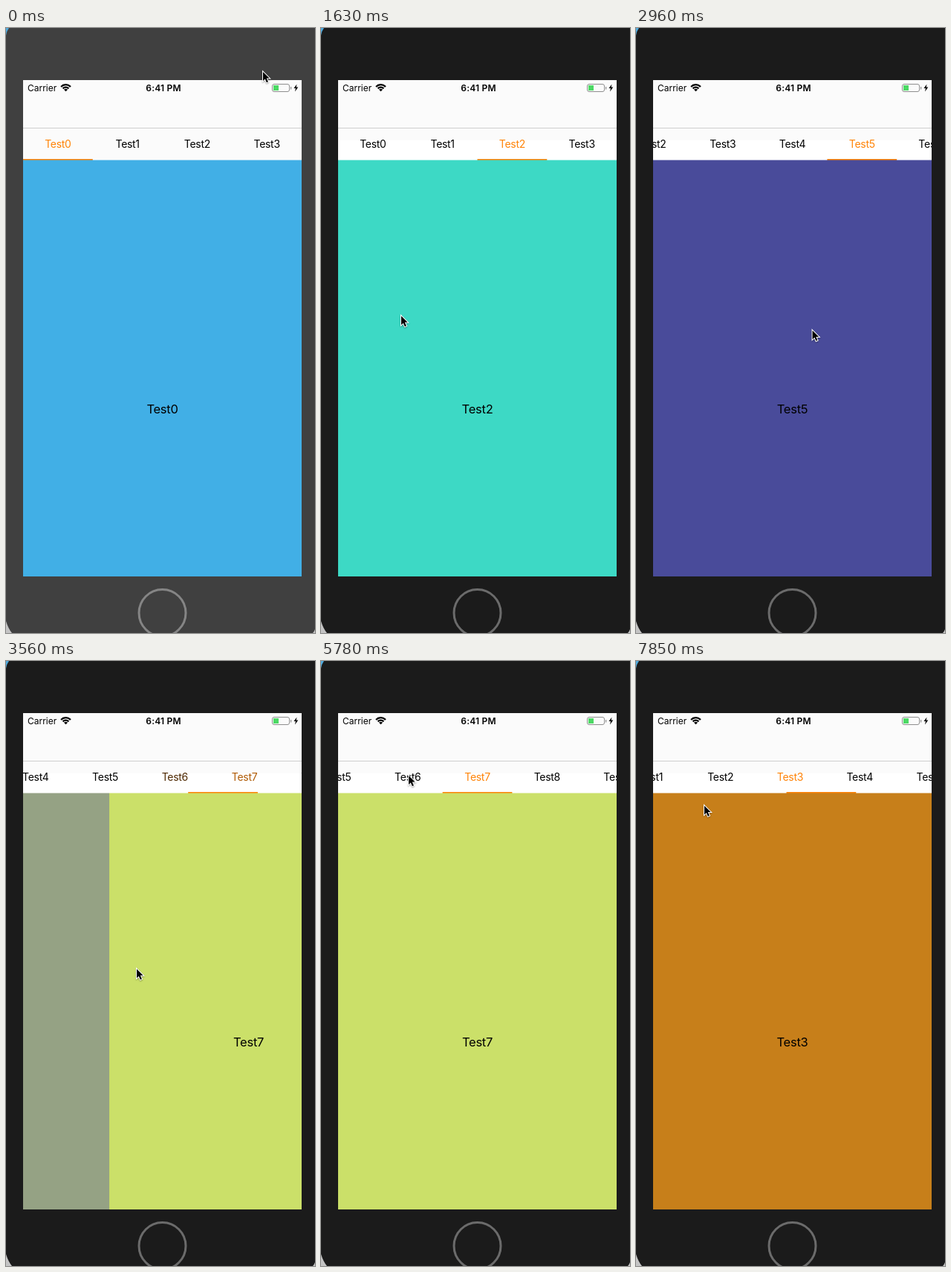
Animation, 416 px wide and 813 px high, one loop 8000 ms. Source, as an HTML page with a canvas:

```html
<!DOCTYPE html>
<html lang="en">
<head>
<meta charset="utf-8">
<title>Paged tabs</title>
<style>
  html, body { margin: 0; width: 100%; height: 100%; overflow: hidden; background: #1b1b1b; }
  canvas { display: block; width: 416px; height: 813px; }
</style>
</head>
<body>
<canvas></canvas>
<script>
const W = 416, H = 813, LOOP = 8000, STEPS = 54;
const SCREEN = { x: 23, y: 70, w: 375, h: 667 };
const TAB = SCREEN.w / 4, PAGE_TOP = 177.5;
const FOCUS_AT = 600, TAPS_AT = 5943;
const LAST_PAGE = 7;

const canvas = document.querySelector('canvas');
const ctx = canvas.getContext('2d');
const ratio = window.devicePixelRatio || 1;
canvas.width = W * ratio;
canvas.height = H * ratio;

const pageColors = ['#41afe6', '#7f9f8a', '#3dd9c5', '#508aa9', '#52f512',
  '#494b9a', '#95a284', '#cbe069'];

// Pointer stops; a stop with drags is reached by swiping that many times.
const stops = [
  { t: 0, x: 345, y: 57 },
  { t: FOCUS_AT, x: 250, y: 380 },
  { t: 1630, x: 107, y: 385, drags: 2 },
  { t: 2220, x: 87, y: 395, drags: 1 },
  { t: 3560, x: 175, y: 412, drags: 3 },
  { t: 4740, x: 150, y: 330 },
  { t: 5100, x: 150, y: 330 },
  { t: 5780, x: 117, y: 152 },
  { t: 7120, x: 104, y: 150 },
  { t: 7700, x: 100, y: 155 },
  { t: LOOP, x: 82, y: 230 }
];

const clamp = (v, low, high) => Math.min(high, Math.max(low, v));
const lerp = (a, b, u) => a + (b - a) * u;
const smooth = u => u * u * (3 - 2 * u);

// Counts pages turned: one per period, each eased over its duration.
function paging(t, { start, period, duration, count }) {
  const turns = clamp((t - start) / period, 0, count);
  const done = Math.floor(turns);
  return done + smooth(Math.min(1, (turns - done) * period / duration));
}

const swipe = { start: 728, period: 451, duration: 200, count: LAST_PAGE };
const stripFollow = { start: 1199, period: 443, duration: 200, count: LAST_PAGE };
const tap = { start: TAPS_AT, period: 600, duration: 200, count: 4 };
const stripTap = { ...tap, duration: 120 };

function stateAt(t) {
  const swiped = paging(t, swipe), tapped = paging(t, tap);
  const stripPage = paging(t, stripFollow) - paging(t, stripTap);
  return {
    page: swiped - Math.ceil(tapped),
    underline: swiped - tapped,
    scroll: Math.max(0, stripPage - 1.5) * TAB,
    focused: t >= FOCUS_AT,
    recolored: t >= TAPS_AT
  };
}

function pointerAt(t) {
  const i = Math.max(1, stops.findIndex(stop => stop.t >= t));
  const a = stops[i - 1], b = stops[i];
  const u = (t - a.t) / (b.t - a.t);
  const swing = 130 * Math.sin(Math.PI * u * (b.drags || 0)) ** 2;
  return [lerp(a.x, b.x, u) + swing, lerp(a.y, b.y, u)];
}

function box(color, x, y, w, h) {
  ctx.fillStyle = color;
  ctx.fillRect(x, y, w, h);
}

function shape(color, path) {
  ctx.fillStyle = color;
  ctx.fill(new Path2D(path));
}

function arc(color, width, x, y, r, from = 0, to = Math.PI * 2) {
  ctx.strokeStyle = color;
  ctx.lineWidth = width;
  ctx.beginPath();
  ctx.arc(x, y, r, from, to);
  ctx.stroke();
}

function text(value, x, y, size, { color = '#000', weight = 400, align = 'center', spacing = 0 } = {}) {
  ctx.font = `${weight} ${size}px Inter, sans-serif`;
  ctx.letterSpacing = `${spacing}px`;
  ctx.textAlign = align;
  ctx.fillStyle = color;
  ctx.fillText(value, x, y);
}

function drawBody(focused) {
  box(focused ? '#1b1b1b' : '#404040', 0, 0, W, H);
  shape('#4fa9dc', 'M0 0H4Q1 4 0 10Z');
  shape('#c4c4c4', 'M0 797Q3 807 8 813H0Z');
  shape('#c4c4c4', 'M416 808Q415 811 413 813H416Z');
  arc(focused ? '#6b6b6b' : '#858585', 3, 210.5, 786, 31.5);
}

function drawStatus() {
  text('Carrier', 29, 84.5, 12, { align: 'left' });
  text('6:41 PM', 212, 84.5, 12, { weight: 600, spacing: 0.2 });

  for (const r of [5.3, 8.8]) arc('#000', 2.3, 80.5, 85, r, -Math.PI * 0.76, -Math.PI * 0.24);
  shape('#000', 'M80.5 85.3L78 82.7Q80.5 80.7 83 82.7Z');

  ctx.strokeStyle = '#8e8e8e';
  ctx.lineWidth = 1;
  ctx.beginPath();
  ctx.roundRect(358.5, 75.5, 23, 10, 2.5);
  ctx.stroke();
  box('#4cd964', 360, 77, 7, 7);
  box('#8e8e8e', 383, 79, 1.2, 3.5);
  shape('#000', 'M391.5 75.5L387.5 81H390L389 85.5L393.3 79.6H390.7Z');
}

function drawPages({ page, recolored }) {
  for (let i = Math.floor(page); i <= Math.ceil(page); i++) {
    const x = SCREEN.x + (i - page) * SCREEN.w;
    const color = i === 3 && recolored ? '#c77f1a' : pageColors[i];
    box(color, x, PAGE_TOP, SCREEN.w, H);
    text('Test' + i, x + SCREEN.w / 2, 517.5, 16.5, { spacing: -0.25 });
  }
}

function drawTabs({ page, underline, scroll, focused }) {
  if (focused) box('#fff', SCREEN.x, 151, SCREEN.w, 27);
  const left = i => SCREEN.x + i * TAB - scroll;
  for (let i = 0; i < 10; i++) {
    const mix = Math.max(0, 1 - Math.abs(i - page));
    const color = `rgb(${255 * mix}, ${132 * mix}, ${8 * mix})`;
    text('Test' + i, left(i) + TAB / 2, 161, 14, { color, spacing: -0.3 });
  }
  box('#ff8408', left(underline), 176, TAB, 2);
}

function drawPointer(x, y) {
  ctx.save();
  ctx.translate(x, y);
  const arrow = new Path2D('M1 2V14L3.8 11.4L5.9 16.2L7.9 15.3L5.8 10.6H9.6Z');
  ctx.shadowColor = 'rgba(0,0,0,.35)';
  ctx.shadowBlur = 2 * ratio;
  ctx.shadowOffsetY = ratio;
  ctx.strokeStyle = '#fff';
  ctx.lineWidth = 2;
  ctx.stroke(arrow);
  ctx.shadowColor = 'transparent';
  ctx.fillStyle = '#000';
  ctx.fill(arrow);
  ctx.restore();
}

function draw(t) {
  const state = stateAt(t);
  ctx.setTransform(ratio, 0, 0, ratio, 0, 0);
  drawBody(state.focused);
  ctx.save();
  ctx.beginPath();
  ctx.rect(SCREEN.x, SCREEN.y, SCREEN.w, SCREEN.h);
  ctx.clip();
  box('#fbfbfb', SCREEN.x, SCREEN.y, SCREEN.w, 108);
  box('#cfcfcf', SCREEN.x, 134, SCREEN.w, 1);
  drawTabs(state);
  drawPages(state);
  drawStatus();
  ctx.restore();
  drawPointer(...pointerAt(t));
}

// Time advances in even steps, rounded to 10 ms.
function stepTime(ms) {
  const step = Math.min(STEPS - 1, Math.floor((ms + 5) * STEPS / LOOP));
  return Math.round(step * LOOP / STEPS / 10) * 10;
}

const begin = performance.now();
function tick() {
  draw(stepTime((performance.now() - begin) % LOOP));
  requestAnimationFrame(tick);
}
tick();
</script>
</body>
</html>
```
